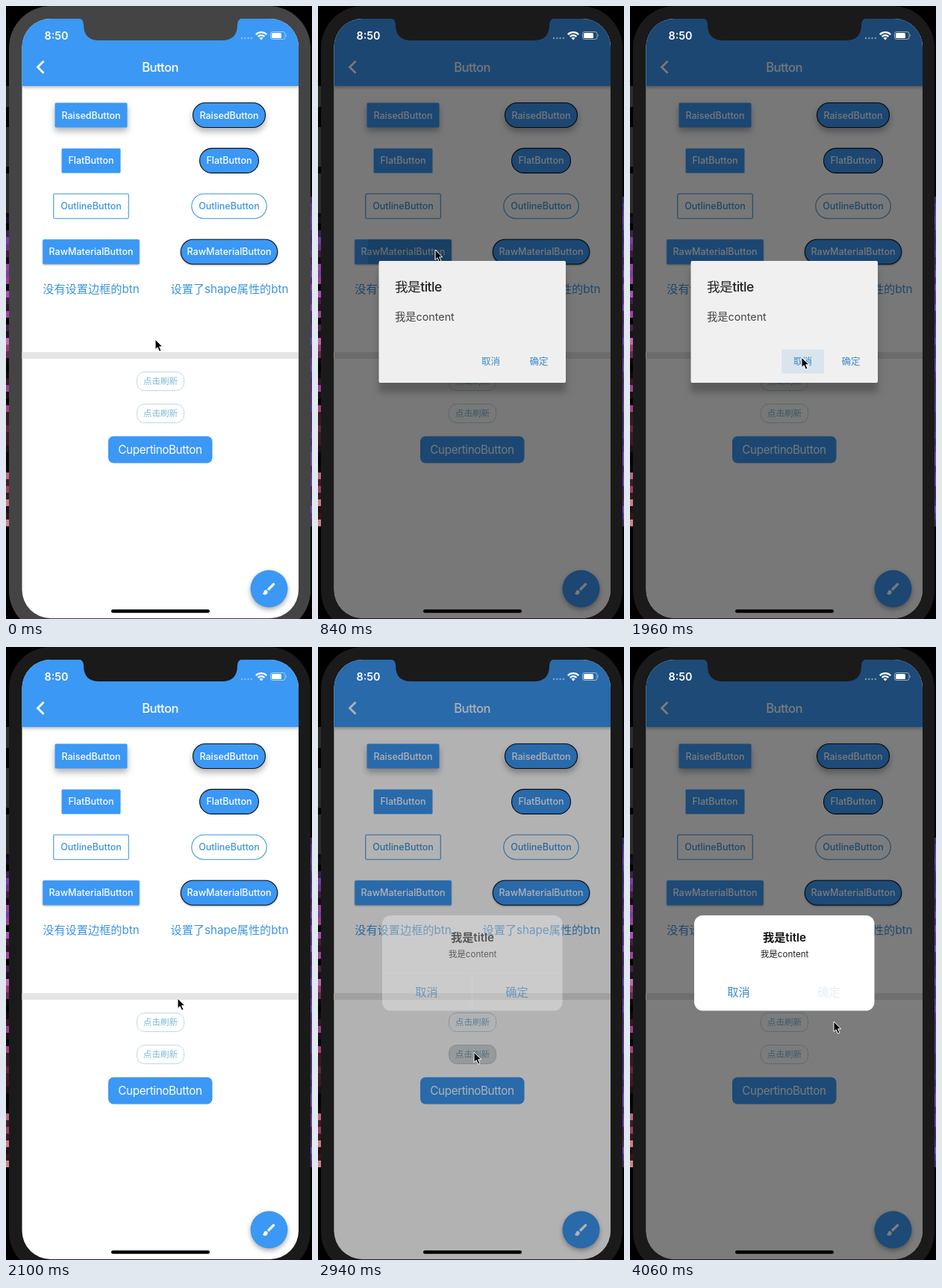
An HTML page that plays this animation: 410x820 px, repeating every 4130 ms.

```html
<!DOCTYPE html>
<html lang="zh-CN">
<head>
<meta charset="utf-8">
<title>Button</title>
<style>
  html, body { margin: 0; width: 100%; height: 100%; overflow: hidden; background: #000; }
  svg { display: block; width: 410px; height: 820px; }
  text { font-family: Inter, "Noto Sans CJK SC", "Noto Sans CJK", sans-serif; }
  .bar { filter: drop-shadow(0 2px 2px rgba(0,0,0,.28)); }
  .raised { filter: drop-shadow(0 5px 4px rgba(0,0,0,.3)); }
  .raw { filter: drop-shadow(0 1px 1px rgba(0,0,0,.35)); }
  .fab { filter: drop-shadow(0 3px 3px rgba(0,0,0,.32)); }
  .sheet { filter: drop-shadow(0 13px 5px rgba(0,0,0,.24)); }
</style>
</head>
<body>
<svg viewBox="0 0 410 820">
  <defs>
    <clipPath id="glass"><rect x="21.5" y="17" width="370.5" height="802" rx="38"/></clipPath>
    <clipPath id="rawShape"><rect x="49" y="312" width="130" height="33" rx="1.5"/></clipPath>
  </defs>

  <rect width="410" height="820"/>
  <g id="wall"></g>
  <rect class="shell" x="4" width="404" height="838" rx="56"/>

  <g clip-path="url(#glass)">
    <rect x="21" y="17" width="372" height="803" fill="#fff"/>
    <g id="page"></g>
    <g clip-path="url(#rawShape)"><circle id="splash" cx="157" cy="328"/></g>
    <rect id="tapped" x="175.5" y="532.5" width="63" height="25" rx="10"/>
    <rect id="dim" x="21" y="17" width="372" height="803"/>
    <g id="material"></g>
    <g id="cupertino"></g>
  </g>

  <path class="shell" d="M96 16 Q104 17 104 25 Q104 46 125 46 H289 Q310 46 310 25 Q310 17 318 16Z"/>
  <g id="status" fill="#fff">
    <path d="M316 43 H330" stroke="#fff" stroke-width="2.6" stroke-linecap="round"
          stroke-dasharray="0 4.3" opacity=".4"/>
    <g fill="none" stroke="#fff" stroke-width="2.2">
      <path d="M334.8 38.2 A10.2 10.2 0 0 1 349.2 38.2"/>
      <path d="M337.6 41 A6.2 6.2 0 0 1 346.4 41"/>
    </g>
    <path d="M342 45.5 L339.5 43 A3.5 3.5 0 0 1 344.5 43Z"/>
    <rect x="354.5" y="34.5" width="19.5" height="10" rx="2.8" fill="none" stroke="#fff" stroke-opacity=".55"/>
    <rect x="356" y="36" width="13" height="7" rx="1.5"/>
    <path d="M375.2 37.7 Q377 39.5 375.2 41.3Z" opacity=".6"/>
  </g>
  <rect x="141" y="807.3" width="132" height="4.4" rx="2.2"/>
  <path id="cursor" d="M0 0 V13.5 L3.1 10.7 L5.4 16 L7.9 14.9 L5.6 9.8 H9.7Z"
        stroke="#fff" stroke-linejoin="round"/>
</svg>

<script>
const LOOP = 4130, STEP = 70;
const BLUE = '#3b98f4', LINK = '#3c96de', ACTION = '#3b8bca';
const $ = id => document.getElementById(id);

// Text is placed by the vertical centre of its line.
function label(str, x, mid, size, fill, o = {}) {
  return `<text x="${x}" y="${mid + size * .365}" font-size="${size}" fill="${fill}"
    font-weight="${o.weight || 400}" text-anchor="${o.anchor || 'middle'}"
    letter-spacing="${o.spacing || 0}" ${o.id ? `id="${o.id}"` : ''}>${str}</text>`;
}

function box(x, y, w, h, r, fill, extra = '') {
  return `<rect x="${x}" y="${y}" width="${w}" height="${h}" rx="${r}" fill="${fill}" ${extra}/>`;
}

function button(name, kind, width, cx, y, pill) {
  const outline = kind === 'outline';
  const edge = outline ? LINK : pill ? '#0a0f18' : 'none';
  return box(cx - width / 2, y + .5, width, 33, pill ? 16.5 : 1.5, outline ? '#fff' : BLUE,
      `stroke="${edge}" stroke-width="1.1" class="${kind}"`) +
    label(name, cx, y + 17, 12.5, outline ? LINK : '#fff', { weight: 500 });
}

function refresh(y) {
  return box(175.5, y + .5, 63, 25, 10, '#fff', 'stroke="#bcd9e8"') +
    label('点击刷新', 207, y + 13, 11.6, '#7bbadb');
}

// Slivers of a night-coloured wallpaper beside the phone, with the side keys on top.
function wallpaper() {
  let seed = 11, out = '';
  const rnd = () => (seed = seed * 16807 % 2147483647) / 2147483647;
  for (let y = 255; y < 690; y += 9) {
    const hue = 255 + (y - 255) * .2 + rnd() * 30;
    out += box(0, y, 6, 9, 0, `hsl(${hue} 42% ${rnd() ** 2 * 68}%)`);
    out += box(404, y, 6, 9, 0, `hsl(${250 + rnd() * 20} 40% ${28 + rnd() * 22}%)`);
  }
  for (const [y, h] of [[107, 28], [162, 53], [224, 53]]) out += box(0, y, 5, h, 0, '#2c2c2c');
  return out;
}

const rows = [['Raised', 97], ['Flat', 79], ['Outline', 100.5], ['RawMaterial', 129.5]];
const kinds = { Raised: 'raised', Flat: 'flat', Outline: 'outline', RawMaterial: 'raw' };

$('wall').innerHTML = wallpaper();

$('page').innerHTML =
  box(21, 10, 372, 97, 0, BLUE, 'class="bar"') +
  label('Button', 206.5, 82, 16.6, '#fff', { weight: 500, spacing: -.55 }) +
  '<path d="M50.5 73.8 L42.5 81.8 L50.5 89.8" fill="none" stroke="#fff" stroke-width="2.8"/>' +
  rows.map(([name, width], i) => [114, 299].map((cx, pill) =>
    button(name + 'Button', kinds[name], width, cx, 129 + i * 60.9, pill)).join('')).join('') +
  label('没有设置边框的btn', 114, 378.5, 15.2, LINK) +
  label('设置了shape属性的btn', 299.5, 378.5, 15.2, LINK) +
  box(21, 463, 372, 9, 0, '#e5e5e5') +
  refresh(489) + refresh(532) +
  box(137, 575.5, 139.5, 36, 7.2, BLUE) +
  label('CupertinoButton', 206.5, 593.5, 15.2, '#fff', { spacing: -.36 }) +
  `<circle cx="352.5" cy="779.5" r="25" fill="${BLUE}" class="fab"/>` +
  `<path transform="translate(341.9 769) scale(.88)" fill="#fff"
     d="M7 14c-1.7 0-3 1.3-3 3 0 1.3-1.2 2-2 2 .9 1.2 2.5 2 4 2 2.2 0 4-1.8 4-4 0-1.7-1.3-3-3-3z
        M20.7 4.6l-1.3-1.3a1 1 0 0 0-1.4 0L9 12.2 11.7 15l9-9a1 1 0 0 0 0-1.4z"/>`;

$('material').innerHTML =
  box(81.5, 341, 250.5, 163, 2, '#f0f0f0', 'class="sheet"') +
  box(203, 459.5, 57, 32, 2, '#d9e4ee', 'id="cancelInk"') +
  label('我是title', 103, 375.5, 17.6, '#222', { weight: 500, anchor: 'start', spacing: -.5 }) +
  label('我是content', 103, 415.5, 14.3, '#444', { anchor: 'start' }) +
  label('取消', 231.5, 475.5, 12.5, ACTION, { weight: 500 }) +
  label('确定', 296, 475.5, 12.5, ACTION, { weight: 500 });

$('cupertino').innerHTML =
  box(86, 359, 241.5, 127.5, 11.5, '#fff', 'id="card"') +
  '<path id="rules" d="M86 436 H327.5 M206.5 436 V486.5" stroke="#e9edf0"/>' +
  label('我是title', 207, 388, 15.2, '#111', { weight: 600 }) +
  label('我是content', 207, 410.5, 11.6, '#222') +
  label('取消', 145.5, 461.5, 15.2, ACTION) +
  label('确定', 266.5, 461.5, 15.2, ACTION, { id: 'confirm' });

$('status').insertAdjacentHTML('beforeend',
  label('8:50', 67.5, 39.5, 14.3, '#fff', { weight: 600 }));

const ramp = (t, from, to) => Math.min(1, Math.max(0, (t - from) / (to - from)));
const smooth = p => p * p * (3 - 2 * p);
const easeOut = p => 1 - (1 - p) ** 2;

// The pointer rests at each stop, then glides on between leave and arrive.
const moves = [
  { x: 157, y: 326, leave: 70, arrive: 560 },
  { x: 230, y: 470, leave: 1120, arrive: 1750 },
  { x: 209, y: 542, leave: 2240, arrive: 2730 },
  { x: 273, y: 455, leave: 3010, arrive: 3430 },
  { x: 273, y: 501, leave: 3850, arrive: 4060 }
];

function pointer(t) {
  let x = 200, y = 446;
  for (const m of moves) {
    const p = smooth(ramp(t, m.leave, m.arrive));
    x += (m.x - x) * p;
    y += (m.y - y) * p;
  }
  return `translate(${x} ${y})`;
}

function draw(t) {
  const set = (id, name, value) => $(id).setAttribute(name, value);
  const fade = (id, value) => set(id, 'opacity', value);

  const material = easeOut(ramp(t, 630, 850)) * (1 - ramp(t, 1960, 2100));
  const cupertino = ramp(t, 2780, 3060);
  const release = ramp(t, 3920, 4060);

  document.querySelectorAll('.shell').forEach(el =>
    el.setAttribute('fill', t < 630 ? '#444' : '#1a1a1a'));
  fade('dim', .53 * (material + cupertino) - .015 * release);
  fade('material', material);
  fade('cancelInk', ramp(t, 1820, 1940));
  fade('splash', .12 * ramp(t, 560, 630) * (1 - ramp(t, 840, 980)));
  set('splash', 'r', 110 * ramp(t, 560, 900));
  fade('tapped', .14 * ramp(t, 2730, 2800) * (1 - ramp(t, 2940, 3080)));

  fade('cupertino', cupertino);
  set('card', 'fill-opacity', cupertino);
  fade('rules', cupertino * (1 - release));
  fade('confirm', 1 - .87 * release);
  set('cursor', 'transform', pointer(t));
}

const start = performance.now();
function tick() {
  const t = (performance.now() - start) % LOOP;
  draw(Math.floor(t / STEP) * STEP);
  requestAnimationFrame(tick);
}
draw(0);
requestAnimationFrame(tick);
</script>
</body>
</html>
```
